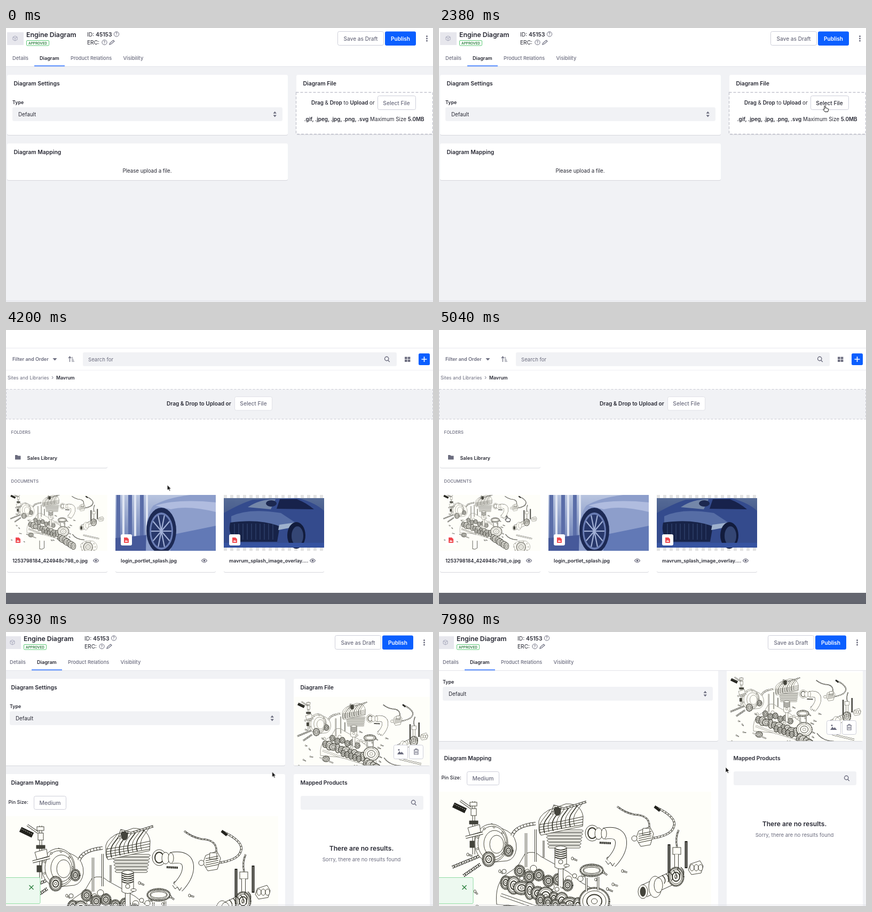
Animation of 800 by 515 pixels, one loop 8000 ms. Source, as an HTML page:

```html
<!DOCTYPE html>
<html lang="en">
<head>
<meta charset="utf-8">
<title>Engine Diagram</title>
<style>
html, body { margin: 0; width: 100%; height: 100%; overflow: hidden; background: #f1f2f5; }
svg { display: block; }
text { font-family: Inter, "Open Sans", sans-serif; white-space: pre; }
#before, #after, #hand, #arrow, #spinner, #results, #pick { animation: 8s step-end infinite; }
#modal, #backdrop, #cursor, #scroll, .diagram { animation: 8s linear infinite; }
#before { animation-name: before; }
#after { animation-name: after; }
#hand { animation-name: hand; }
#arrow { animation-name: arrow; }
#spinner { animation-name: loading; }
#results { animation-name: loaded; }
#pick { animation-name: pick; }
#backdrop { animation-name: backdrop; }
#modal { animation-name: modal; }
#cursor { animation-name: cursor; }
#scroll { animation-name: scroll; }
.diagram { animation-name: reveal; }
.dots { transform-origin: 666px 399px; animation: spin 790ms linear infinite; }
@keyframes before { 0% { opacity: 1 } 66.5%, 100% { opacity: 0 } }
@keyframes after { 0% { opacity: 0 } 66.5%, 100% { opacity: 1 } }
@keyframes loading { 0% { opacity: 1 } 74.375%, 100% { opacity: 0 } }
@keyframes loaded { 0% { opacity: 0 } 74.375%, 100% { opacity: 1 } }
@keyframes hand { 0% { opacity: 0 } 27.5% { opacity: 1 } 36.75% { opacity: 0 } 56.875% { opacity: 1 } 66.5%, 100% { opacity: 0 } }
@keyframes arrow { 0% { opacity: 0 } 18.375% { opacity: 1 } 27.5% { opacity: 0 } 36.75% { opacity: 1 } 56.875% { opacity: 0 } 66.5%, 100% { opacity: 1 } }
@keyframes pick { 0% { fill: #6b6c7e } 27.5% { fill: #272833 } 36.75%, 100% { fill: #6b6c7e } }
@keyframes backdrop { 0%, 35% { opacity: 0 } 38%, 66.4% { opacity: .69 } 66.5%, 100% { opacity: 0 } }
@keyframes modal {
  0%, 36.5% { opacity: 0; transform: translateY(-60px); animation-timing-function: ease-out }
  39.375% { opacity: 1; transform: translateY(-10px); animation-timing-function: ease-out }
  42%, 66.49% { opacity: 1; transform: none }
  66.5%, 100% { opacity: 0; transform: none }
}
@keyframes cursor {
  0%, 18.375% { transform: translate(600px, 515px); animation-timing-function: ease-in-out }
  28%, 45.5% { transform: translate(722px, 146px); animation-timing-function: ease-in }
  52.5% { transform: translate(303px, 291px); animation-timing-function: ease-out }
  57.5%, 78.75% { transform: translate(126px, 349px); animation-timing-function: ease-in-out }
  88.75%, 92.75% { transform: translate(536px, 254px) }
  99.75%, 100% { transform: translate(537px, 254px) }
}
@keyframes scroll {
  0%, 90.625% { transform: none }
  92.75% { transform: translateY(-11px) }
  99.75%, 100% { transform: translateY(-46px) }
}
@keyframes reveal { 0%, 66.5% { opacity: 0 } 69.125% { opacity: .38 } 74.375%, 100% { opacity: 1 } }
@keyframes spin { to { transform: rotate(360deg) } }
</style>
</head>
<body>
<script>
const INK = '#272833', GREY = '#6b6c7e', PALE = '#f1f2f5', BLUE = '#0b5fff', EDGE = '#cdced9';

const text = (x, y, s, size, weight = 400, fill = INK, more = '') =>
  `<text x="${x}" y="${y}" font-size="${size}" font-weight="${weight}" fill="${fill}" ${more}>${s}</text>`;
const mid = 'text-anchor="middle"';
const rect = (x, y, w, h, fill, more = '') =>
  `<rect x="${x}" y="${y}" width="${w}" height="${h}" fill="${fill}" ${more}/>`;
const path = (d, more = '') => `<path d="${d}" ${more}/>`;
const line = (d, color, width = 1, more = '') =>
  path(d, `fill="none" stroke="${color}" stroke-width="${width}" ${more}`);
const group = (s, more = '') => `<g ${more}>${s}</g>`;
const repeat = (n, f) => Array.from({ length: n }, (_, i) => f(i)).join('');
const card = (x, y, w, h) =>
  rect(x, y + 1, w, h, '#d5d6dc', 'rx="3"') + rect(x, y, w, h, '#fff', 'rx="3"');
const button = (x, y, w, h) => rect(x + .5, y + .5, w, h, '#fff', `rx="3" stroke="${EDGE}"`);
const lens = (x, y) =>
  line(`M${x - 4.5} ${y - 1}a3.7 3.7 0 1 0 7.4 0a3.7 3.7 0 1 0-7.4 0M${x + 1.8} ${y + 2}l3 3`, GREY, 1.4);

// Line drawing of the engine
let seed = 7;
const random = () => (seed = seed * 16807 % 2147483647) / 2147483647;
const oval = (x, y, rx, ry = rx, more = '') =>
  `<ellipse cx="${x}" cy="${y}" rx="${rx}" ry="${ry}" ${more}/>`;
const gear = (x, y, rx, ry = rx) =>
  oval(x, y, rx, ry, 'stroke-width="3.4" stroke-dasharray="1.7 .8"') + oval(x, y, rx * .78, ry * .78) +
  oval(x, y, rx * .5, ry * .5, 'stroke-width="1.8"') + oval(x, y, rx * .2, ry * .2);
const tube = (d, w) => line(d, '#2c2c26', w) + line(d, '#fffef7', w - 1.8);
const hose = (d, w = 3) => line(d, '#2c2c26', w) + line(d, '#fffef7', w - 1.8, 'stroke-dasharray="5 1"');
const chain = d => line(d, '#2c2c26', 6, 'stroke-dasharray="2 1"') + line(d, '#fffef7', 2, 'stroke-dasharray="3 2"');

const drum = () =>
  path('M98 60L128 74Q146 84 145 107Q142 127 128 130L98 133Z') + oval(98, 97, 31, 36) + oval(100, 97, 27, 32) +
  oval(104, 98, 20, 25) + oval(108, 99, 13, 17) + gear(130, 111, 8, 10) +
  repeat(9, i => oval(98 + 27 * Math.cos(i * .7), 97 + 31 * Math.sin(i * .7), 1.8));
const column = () =>
  tube('M65 18V118', 5) + rect(58, 20, 13, 7, '#fffef7') + rect(60, 32, 10, 13, '#fffef7') + tube('M40 17L60 31', 4) +
  rect(57, 55, 16, 6, '#44443c') + path('M54 68L76 62L78 76L58 82Z') + tube('M50 86L82 78', 5) + rect(58, 93, 8, 12, '#44443c') +
  line('M27 25L50 36', '#22221d', 10) + line('M29 24L49 34', '#fffef7', .8, 'stroke-dasharray="2 2"');
const head = () =>
  repeat(6, i => path(`M${202 + i} ${72 + i * 6}h${66 - i * 2}q4 2 0 4h${-66 + i * 2}q-5-2 0-4Z`)) +
  path('M187 63Q184 47 205 35L238 23Q266 22 270 47L269 65Q235 72 191 82Q186 76 187 63Z') +
  repeat(9, i => line(`M${190 + i * 8} ${80 - i * 2}q-5-16 4-27l${15 - i * .6} ${-20 + i * .7}`, '#33332b', i % 2 ? 1.7 : .9)) +
  repeat(4, i => line(`M188 ${62 + i * 5}Q230 ${57 + i * 4} 270 ${47 + i * 5}`, '#33332b')) +
  hose('M211 43L216 27L234 32L276 19', 4) + oval(222, 37, 6, 8, 'fill="#44443c"');
const piston = () =>
  tube('M228 134V178', 10) + path('M217 105Q228 99 239 105V142Q228 149 217 142Z') +
  repeat(5, i => line(`M217 ${107 + i * 4}q11 6 22 0`, '#2c2c26', 1.6)) + oval(228, 132, 4) + oval(239, 139, 5, 2.5);
const pipe = () =>
  oval(287, 78, 13, 15) + oval(287, 78, 8, 10, 'stroke-width="2"') + oval(299, 79, 7, 11) +
  tube('M309 79Q342 73 341 98Q340 115 322 134', 22) + oval(309, 79, 5, 10) + line('M312 130l5 7l4-4l4 7l4-6', '#33332b') +
  line('M301 96L322 97', '#22221d', 4, 'stroke-dasharray="2 .7"');
const carburetor = () =>
  hose('M334 28Q347 39 365 43Q400 44 393 73', 3) + hose('M404 28Q447 48 440 66Q435 83 397 88', 4) +
  line('M404 28L414 36', '#22221d', 5) + path('M374 74L395 66L402 79L396 100L378 103L369 88Z') +
  path('M382 69h13v12h-14Z') + repeat(5, i => line(`M374 ${80 + i * 4}l24-5`, '#33332b')) + oval(366, 88, 5);
const exhaust = () =>
  hose('M449 72Q442 87 446 105', 3) + rect(438, 105, 15, 13, '#fffef7') + tube('M445 118V150', 8) +
  line('M431 99V154M463 93V144', '#22221d', 5) + line('M431 101V152M463 95V142', '#fffef7', .8) +
  path('M471 136l18-6l6 10l-4 13l-18 3l-6-9Z') + repeat(3, i => oval(474 + i * 8, 143, 4, 6)) +
  tube('M384 187L438 162', 25) + oval(382, 188, 9, 13) + oval(382, 188, 5, 9, 'fill="#44443c"') +
  oval(405, 179, 12, 20) + oval(411, 176, 8, 14) + gear(444, 160, 14, 17) +
  repeat(6, i => line(`M${422 + i * 7} ${173 - i * 3}q5-8-4-16`, '#33332b', 1.3));
const gearbox = () =>
  path('M108 212Q104 171 128 154L147 141L161 117Q178 109 191 122L218 137L242 151L267 171L300 190L310 240L250 240L180 218Z') +
  repeat(14, i => oval(122 + i * 11, 150 + 16 * Math.sin(i * .9) + i * 2, 4 + i % 3)) +
  tube('M163 78V142', 4) + tube('M181 71V132', 4) + tube('M196 92V124', 3) +
  repeat(10, i => gear(125 + i * 15, 171 + i * 5, 9 + i % 3 * 3, 12 + i % 2 * 4)) +
  repeat(6, i => gear(151 + i * 18, 149 + i * 4 + i % 2 * 7, 9, 10)) +
  tube('M116 194L190 220', 6) + repeat(5, i => gear(190 + i * 14, 204 + i * 5, 8, 11)) + gear(291, 206, 28, 25);
const lowerParts = () =>
  repeat(7, i => gear(276 + i * 11, 238 + i * 7, 12 + i % 2 * 3, 17)) +
  path('M378 272Q403 245 442 255Q469 272 459 296Q420 323 386 304Z') + gear(416, 285, 23, 24) +
  repeat(10, i => oval(416 + 36 * Math.cos(i * .63), 284 + 28 * Math.sin(i * .63), 2.5)) +
  line('M172 252V294Q183 300 195 290V253', '#33332b', 2) + gear(128, 224, 12, 10) + tube('M105 219L154 239', 4) +
  hose('M337 220Q355 247 398 249') + tube('M392 224L471 243', 6);
const looseBolts = () => repeat(38, i => {
  const x = 30 + random() * 315, y = 118 + random() * 142;
  return tube(`M${x} ${y}l${5 + random() * 6} ${2 + random() * 4}`, 3) + oval(x, y, 2, 2.8);
});
const engine = rect(0, 0, 515, 400, '#fefef9') + group(
  looseBolts() + chain('M25 142L76 121') + chain('M46 158L78 136') + drum() + column() + gear(93, 127, 11, 13) +
  hose('M137 83Q143 64 181 60', 6) + gearbox() + head() + piston() + pipe() + carburetor() + exhaust() +
  gear(286, 148, 21, 11) + oval(286, 148, 15, 6) + tube('M276 162V188', 4) + tube('M298 160V186', 4) + lowerParts(),
  'fill="#fffef7" stroke="#33332b" stroke-width=".9"');
const drawing = (x, y, k) => `<use href="#engine" transform="translate(${x} ${y}) scale(${k})"/>`;

// Page furniture
const help = (x, y) => `<circle cx="${x}" cy="${y}" r="4.6" fill="none" stroke="${GREY}"/>` + text(x, y + 2.5, '?', 7, 600, GREY, mid);
const header = rect(-5, 0, 815, 72, '#fff') + rect(-5, 72, 815, 1, '#e2e3e9') +
  rect(2, 8, 31, 24, '#e7e7ed') + line('M17 15l4 2v5l-4 2l-4-2v-5ZM13 17l4 2l4-2M17 19v5', '#a7a9bc') +
  text(38, 16.5, 'Engine Diagram', 12.3, 600) +
  rect(38.5, 23.5, 42, 9.5, '#fff', 'rx="1.5" stroke="#5aca75"') + text(59.5, 30.8, 'APPROVED', 6.4, 600, '#287d3c', mid) +
  text(152, 16, 'ID: <tspan font-weight="600">45153</tspan>', 10.3) + help(207, 11.5) +
  text(152, 31.3, 'ERC:', 10.2) + help(184.5, 27) + line('M194 31l1-3l6-5l2 2l-6 5Z', GREY, 1.2) +
  button(621, 6, 86, 26) + text(664.5, 23.6, 'Save as Draft', 10.1, 500, GREY, mid) +
  rect(710, 6.5, 58, 26.5, BLUE, 'rx="3"') + text(739, 23.6, 'Publish', 10.1, 600, '#fff', mid) +
  [15.5, 19.8, 24].map(y => `<circle cx="788.5" cy="${y}" r="1.5" fill="${GREY}"/>`).join('') +
  text(12, 60, 'Details', 9.2, 500, GREY) + text(63, 60, 'Diagram', 9.1, 600) +
  text(121, 60, 'Product Relations', 9.2, 500, GREY) + text(219.5, 60, 'Visibility', 9.3, 500, GREY) +
  rect(53, 70, 57, 2.4, '#6f9dff');
const settings = height => card(2, 88, 526, height) + text(14.5, 108, 'Diagram Settings', 10.4, 600) +
  text(12, 143, 'Type', 8.8, 600) + rect(12, 149, 506, 26, PALE, 'rx="3"') + text(23, 165.8, 'Default', 9.8) +
  path('M500.5 160.8l3.2-4l3.2 4ZM500.5 163.5l3.2 4l3.2-4Z', `fill="${GREY}"`);

const before = settings(113) +
  card(544, 88, 260, 112) + text(556.5, 108, 'Diagram File', 10.4, 600) +
  rect(543.5, 121, 256, 78.5, '#fff', 'stroke="#c3c4ce" stroke-width="1.3" stroke-dasharray="5 3"') +
  text(572, 143.5, '<tspan font-weight="600">Drag</tspan> &amp; <tspan font-weight="600">Drop</tspan> to <tspan font-weight="600">Upload</tspan> or', 9.9) +
  button(696, 127, 71, 26) + text(731.5, 144.8, 'Select File', 10.2, 500, GREY, mid + ' id="pick"') +
  text(671, 175, '<tspan font-weight="600">.gif, .jpeg, .jpg, .png, .svg</tspan> Maximum Size <tspan font-weight="600">5.0MB</tspan>', 9.9, 400, INK, mid) +
  card(2, 217, 526, 69) + text(14.5, 237, 'Diagram Mapping', 10.4, 600) +
  text(264.5, 272, 'Please upload a file.', 9.7, 400, INK, mid) + header + rect(0, 512.5, 800, 1, '#dddee5');

const spinner = group(repeat(6, i => {
  const a = i * Math.PI / 3;
  return `<circle cx="${666 + 9 * Math.sin(a)}" cy="${399 - 9 * Math.cos(a)}" r="${[4.2, 1.8, 2, 2.4, 2.9, 3.4][i]}" opacity="${[1, .2, .25, .4, .55, .7][i]}" fill="${GREY}"/>`;
}), 'class="dots"');
const after = group(
  group(settings(163), 'transform="translate(-5)"') +
  card(539, 88, 255, 163) + text(551.5, 108, 'Diagram File', 10.4, 600) +
  group(drawing(533, 122, .52), 'clip-path="url(#preview)"') +
  button(726, 212, 26, 26) + path('M733 230l4-6l2.500 3l2-2l4 5Z', `fill="${GREY}"`) + `<circle cx="736" cy="221.500" r="1.500" fill="${GREY}"/>` +
  button(755, 212, 26, 26) + line('M764 221.500h9M767 221v-1.500h3v1.500M765 222v8h7v-8M767.300 224v4M769.700 224v4', GREY, 1.2) +
  card(-3, 267, 526, 320) + text(9.5, 287, 'Diagram Mapping', 10.4, 600) +
  text(4.5, 323, 'Pin Size:', 9.1, 500) + button(52, 308, 60, 25) + text(82.5, 325, 'Medium', 10.4, 500, GREY, mid) +
  group(drawing(0, 346, 1), 'class="diagram" clip-path="url(#mapping)"') +
  card(539, 267, 255, 320) + text(551.5, 287, 'Mapped Products', 10.3, 600) +
  rect(552, 308, 230, 26, PALE, 'rx="3"') + lens(764, 321) +
  group(spinner, 'id="spinner"') +
  group(text(666, 411, 'There are no results.', 12.1, 600, INK, mid) +
    text(666, 431.3, 'Sorry, there are no results found', 9.6, 400, GREY, mid), 'id="results"'), 'id="scroll"') +
  group(header, 'transform="translate(-5)"') +
  rect(-5, 461.5, 69, 49, '#edf9f0', 'rx="2" stroke="#8fdba2"') + line('M43.500 476l8 8M51.500 476l-8 8', '#287d3c', 1.4) +
  rect(0, 512.5, 800, 1, '#dddee5');

// Photographs reduced to a few tones
const wheelPhoto = rect(205, 310, 188, 105, 'url(#sky)') +
  repeat(6, i => rect(207 + i * 11, 310, i % 2 ? 4 : 7, 84, i % 2 ? '#dfe5f2' : '#5a6da8')) +
  path('M205 391l62-6l30 30h-92Z', 'fill="#46599a"') +
  path('M263 375Q264 345 276 330Q302 315 345 310H393V415H262Z', 'fill="#8d9ecb"') +
  path('M280 330Q320 317 393 324V342Q340 329 309 337Z', 'fill="#b0bcdf"') +
  path('M315 384L393 368V415H308Z', 'fill="#6279b6"') +
  oval(291, 377, 28, 43, 'fill="#1d2a55"') + oval(291, 378, 22, 35, 'fill="#6a7db5"') + oval(291, 378, 19, 31, 'fill="#28386b"') +
  repeat(10, i => line(`M291 378L${291 + 19 * Math.cos(i * .628)} ${378 + 31 * Math.sin(i * .628)}`, '#a2b0d6', 2.2));
const frontPhoto = repeat(32, i => rect(408 + i % 16 * 12, i < 16 ? 310 : 409, 6, 6, '#e3e3e3')) +
  rect(408, 316, 188, 93, 'url(#dusk)') +
  path('M408 344Q440 326 462 319L548 316Q580 325 596 340V409H408Z', 'fill="#344b8d"') +
  path('M453 333Q475 318 505 318L496 337Z', 'fill="#7487a9"') +
  path('M507 336L513 318H545Q563 325 577 337Z', 'fill="#17224b"') +
  path('M422 350Q455 334 515 344L542 362L512 369Q466 357 422 362Z', 'fill="#566da5"') +
  path('M420 362Q475 354 513 369L508 398H436Q414 388 420 362Z', 'fill="#172348"') +
  repeat(10, i => line(`M${428 + i * 8} 364v30`, '#435786', .8)) +
  path('M512 366l29-4l-10 10l-21 4Z', 'fill="#9eb1cd"') + oval(497, 326, 10, 6, 'fill="#1c2850"') +
  oval(544, 386, 17, 25, 'fill="#121c3d"') + oval(546, 387, 11, 18, 'fill="#344674"') + rect(408, 400, 188, 9, '#3653a0');

const asset = (x, name, picture) => card(x, 310, 188, 145) + group(picture, `clip-path="url(#thumb${x})"`) +
  rect(x + 10, 384, 21, 21, '#fff', 'rx="3"') + path(`M${x + 16} 390h6l3 3v7h-9Z`, 'fill="#f0484e"') +
  path(`M${x + 17.5} 398l2-3l1.500 1.500l1-1l1.500 2.500Z`, 'fill="#fff"') +
  text(x + 10, 437, name, 9.1, 600) +
  line(`M${x + 161.500} 433.500q5-7 10 0q-5 7-10 0Z`, GREY, 1.2) + `<circle cx="${x + 166.500}" cy="433.500" r="2" fill="${GREY}"/>`;
const modal = rect(0, -60, 800, 554, '#fff') + rect(0, 33.5, 800, 1, '#e7e7ed') + rect(0, 75, 800, 1, '#eff0f3') +
  text(12, 58.3, 'Filter and Order', 9, 600, GREY) + path('M87.500 53h8l-4 4.500Z', `fill="${GREY}"`) +
  line('M119.500 60v-9M117 53l2.500-3l2.500 3M123 51.500h2M123 54h3M123 56.500h4M123 59h5', GREY, 1.2) +
  rect(144, 42, 588, 26, PALE, 'rx="3"') + text(154, 58.6, 'Search for', 9.6, 400, GREY) + lens(714, 55) +
  repeat(4, i => rect(747 + i % 2 * 5.7, 50.5 + (i >> 1) * 5.2, 4.7, 4.2, GREY)) +
  rect(773, 44, 21, 22, BLUE, 'rx="2.500"') + line('M778.500 55h10M783.500 50v10', '#fff', 1.6) +
  text(3, 92.7, 'Sites and Libraries', 8.9, 400, GREY) + line('M86 87l2.200 2.500l-2.200 2.500', GREY) + text(94, 92.7, 'Mavrum', 8.7, 600) +
  rect(.5, 111.5, 799, 56, PALE, 'stroke="#c9cad3" stroke-dasharray="4 3"') +
  text(301, 142.2, 'Drag &amp; Drop to Upload or', 10.1, 600) + rect(428.5, 125.5, 70, 25.5, '#fff', 'rx="3" stroke="#e0e1e7"') +
  text(463.5, 142.2, 'Select File', 10.2, 500, GREY, mid) +
  text(9.5, 195, 'FOLDERS', 8, 500, GREY) + card(2, 222, 188, 37) +
  path('M17 235h4l1.500 1.500h5v7h-10.500Z', `fill="${GREY}"`) + text(39.5, 243.5, 'Sales Library', 9, 600) +
  text(9.5, 287.3, 'DOCUMENTS', 7.9, 500, GREY) +
  asset(2, '1253798184_424948c798_o.jpg', drawing(-1, 302, .372)) +
  asset(205, 'login_portlet_splash.jpg', wheelPhoto) + asset(408, 'mavrum_splash_image_overlay....', frontPhoto);

const cursor = group(path('M0 0V10L2.300 8L4 11.500L5.600 10.700L4 7.400H7Z', 'fill="#111" stroke="#fff" stroke-width=".7"'), 'id="arrow"') +
  group(path('M0 1Q1.300-.8 2.200 1V4.500Q4 3.500 4.300 5Q6 4.300 6.200 5.700Q8 5.500 7.700 7.500L6.500 11.500H1L-2.200 7.300Q-1.600 5.500 0 7Z', 'fill="#fff" stroke="#111" stroke-width="1"'), 'id="hand"');

const clip = (id, x, y, w, h) => `<clipPath id="${id}">${rect(x, y, w, h, '#000')}</clipPath>`;
const shade = (id, from, to) =>
  `<linearGradient id="${id}" x2="0" y2="1"><stop stop-color="${from}"/><stop offset="1" stop-color="${to}"/></linearGradient>`;
const defs = group(engine, 'id="engine"') + clip('preview', 540, 122, 254, 129) + clip('mapping', 0, 343, 510, 220) +
  [2, 205, 408].map(x => clip('thumb' + x, x, 310, 188, 105)).join('') +
  shade('sky', '#b8c4df', '#6378b1') + shade('dusk', '#566b96', '#263978');

document.body.innerHTML = `<svg width="800" height="515" viewBox="0 0 800 515"><defs>${defs}</defs>
  ${rect(0, 0, 800, 515, PALE)}
  ${group(before, 'id="before"')}
  ${group(rect(0, 0, 800, 515, PALE) + after, 'id="after"')}
  ${rect(0, 0, 800, 515, INK, 'id="backdrop"')}
  ${group(modal, 'id="modal"')}
  ${group(cursor, 'id="cursor"')}</svg>`;
</script>
</body>
</html>
```
